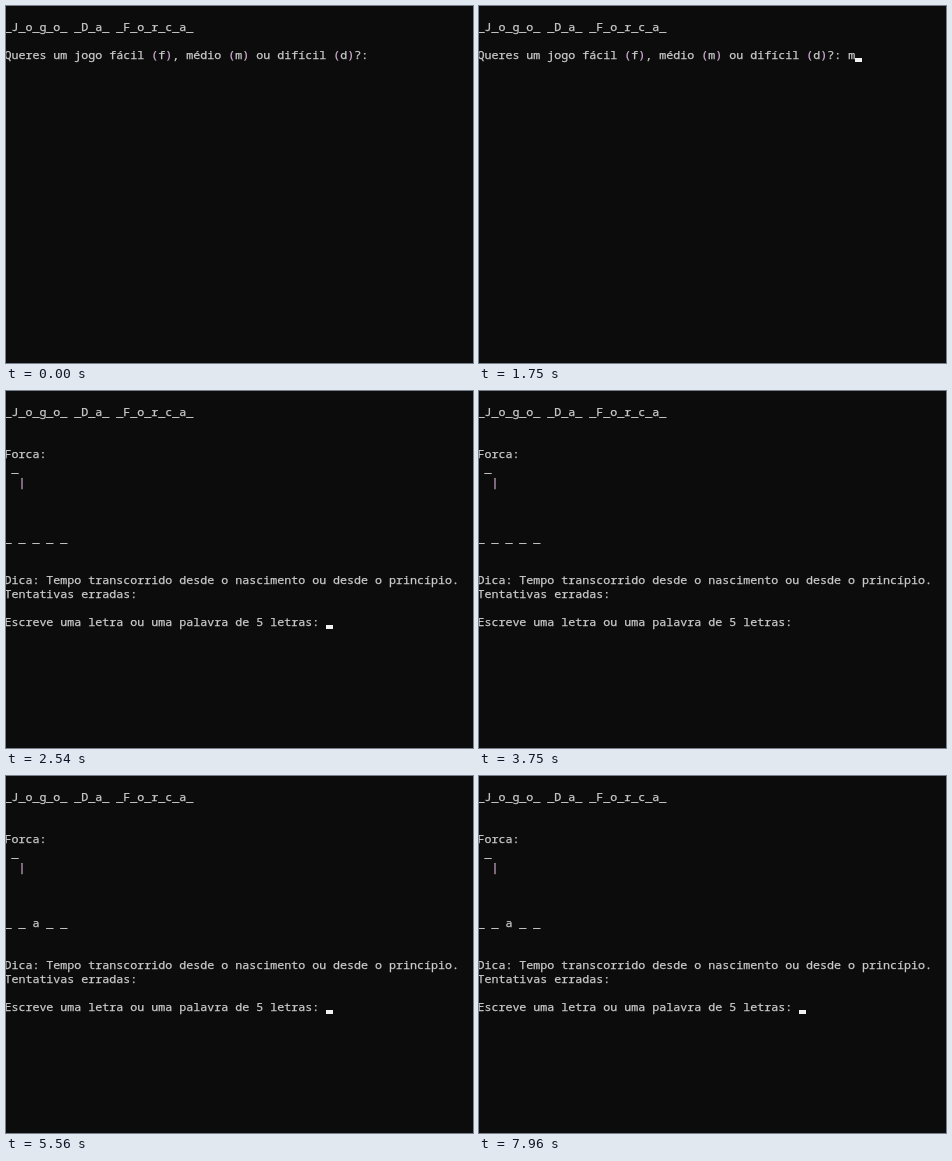
Recreate the animation shown at these times as an HTML page. Size 467 by 357 pixels, loop 8 s.

```html
<!DOCTYPE html>
<html lang="pt">
<head>
<meta charset="utf-8">
<title>Jogo da Forca</title>
<style>
  html, body { margin: 0; width: 100%; height: 100%; overflow: hidden; background: #0c0c0c; }
  svg { display: block; width: 467px; height: 357px; }
  text {
    font: 11.667px "Noto Sans Mono", "DejaVu Sans Mono", monospace;
    color: #ccc; fill: currentColor; stroke: currentColor; stroke-width: .25px;
    white-space: pre;
  }
  .tint { color: #d2aed2; }
  rect { fill: #f2f2f2; }
</style>
</head>
<body>
<svg id="screen" viewBox="0 0 467 357"></svg>
<script>
const LOOP = 8000, BLINK = 535, COL = 7, ROW = 14, LEFT = -2;
const screen = document.getElementById('screen');

const title = '\n_J_o_g_o_ _D_a_ _F_o_r_c_a_\n\n';
const ask = title + 'Queres um jogo fácil (f), médio (m) ou difícil (d)?: ';
const board = word => `${title}
Forca:
 _
  |



${word}


Dica: Tempo transcorrido desde o nascimento ou desde o princípio.
Tentativas erradas:

Escreve uma letra ou uma palavra de 5 letras: `;
const blank = board('_ _ _ _ _');

// The cursor stands at the end of the text and first toggles at `blink`.
const scenes = [
  { at: 0, text: ask, blink: 70, lit: false },
  { at: 1750, text: ask + 'm', blink: 2210 },
  { at: 2410, text: ask + 'm\n' },
  { at: 2540, text: blank, blink: 3220 },
  { at: 4760, text: blank },
  { at: 4830, text: blank + 'a', blink: 5290 },
  { at: 5490, text: blank + 'a\n' },
  { at: 5560, text: board('_ _ a _ _'), blink: 6350 }
];

function add(name, attrs, parent) {
  const el = document.createElementNS('http://www.w3.org/2000/svg', name);
  for (const key in attrs) el.setAttribute(key, attrs[key]);
  return parent.appendChild(el);
}

// Hard steps of opacity: each [time, value] holds until the next one.
function play(el, steps) {
  const frames = steps.map(([t, opacity]) => ({ opacity, offset: t / LOOP, easing: 'steps(1, end)' }));
  frames.push({ opacity: steps[steps.length - 1][1], offset: 1 });
  el.animate(frames, { duration: LOOP, iterations: Infinity }).startTime = 0;
}

function write(line, row, parent) {
  const el = add('text', { x: LEFT + .4, y: row * ROW + 11 }, parent);
  for (const part of line.split(/([()|])/)) {
    add('tspan', /[()|]/.test(part) ? { class: 'tint' } : {}, el).textContent = part;
  }
}

scenes.forEach(({ at, text, blink = LOOP, lit = true }, i) => {
  const end = i + 1 < scenes.length ? scenes[i + 1].at : LOOP;
  const group = add('g', {}, screen);
  const lines = text.split('\n');
  lines.forEach((line, row) => line && write(line, row, group));

  const shown = [[at, 1]];
  if (at > 0) shown.unshift([0, 0]);
  if (end < LOOP) shown.push([end, 0]);
  play(group, shown);

  const row = lines.length - 1;
  const cursor = add('rect', {
    x: LEFT + lines[row].length * COL, y: row * ROW + 10, width: COL, height: 4
  }, group);
  const flips = [[0, +lit]];
  for (let t = blink; t < end; t += BLINK) flips.push([t, +(lit = !lit)]);
  play(cursor, flips);
});
</script>
</body>
</html>
```
